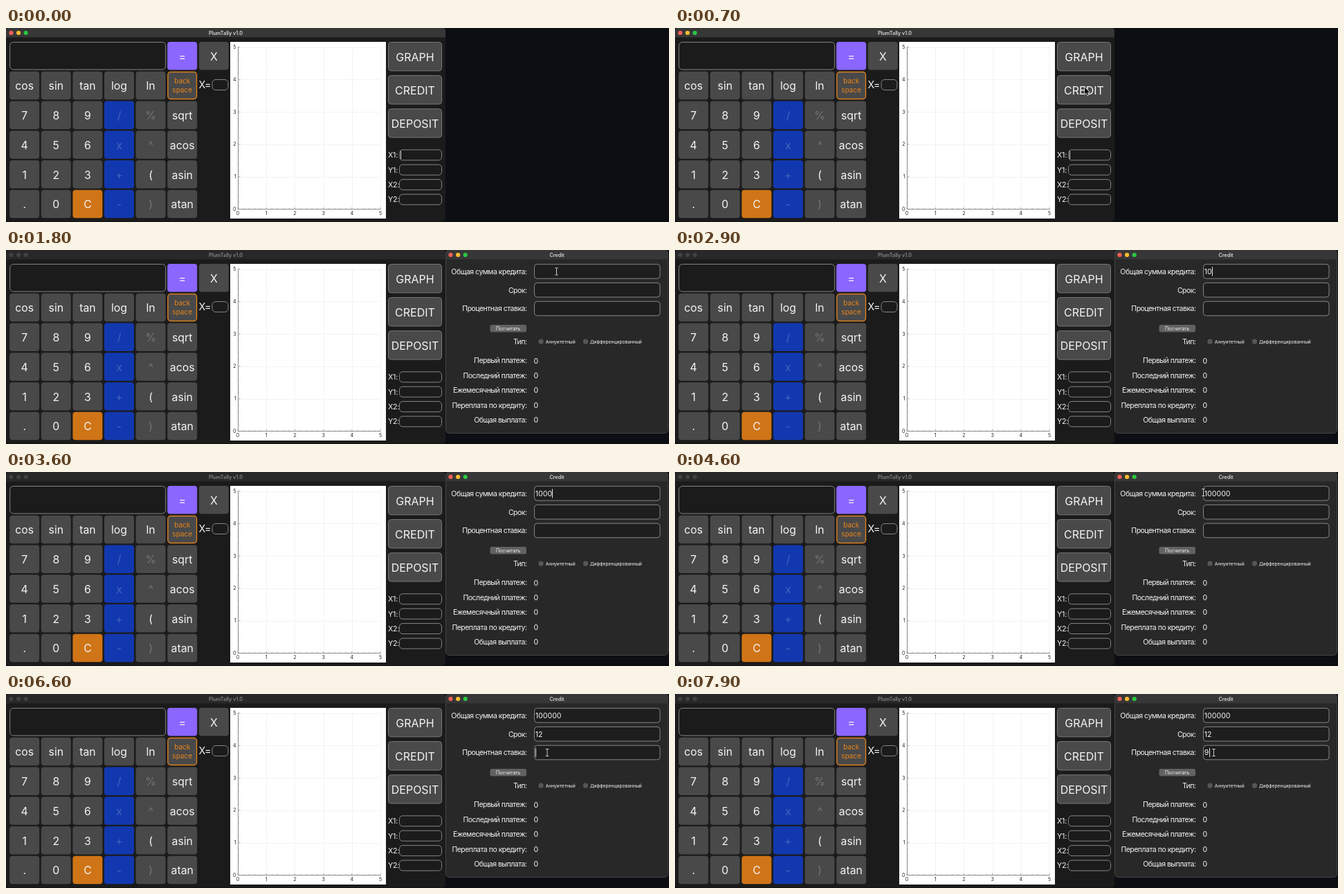
Recreate the animation shown at these times as an HTML page with a canvas. Size 958 by 280 pixels, loop 8000 ms.

```html
<!DOCTYPE html>
<html lang="ru">
<head>
<meta charset="utf-8">
<title>Calculator</title>
<style>
html, body { margin: 0; width: 100%; height: 100%; overflow: hidden; background: #0d0e13; }
canvas { display: block; }
</style>
</head>
<body>
<canvas id="stage" width="958" height="280"></canvas>
<script>
const ctx = document.getElementById('stage').getContext('2d');
const LOOP = 8000;
const OPEN = 800;
const GREY = '#494949', DARK = '#1b1b1b', EDGE = '#858585', WHITE = '#f4f4f4';
const BLUE = '#1238b0', ORANGE = '#cf7417';

function box(x, y, w, h, r, fill, edge, line = 1) {
  ctx.beginPath();
  ctx.roundRect(x, y, w, h, r);
  if (fill) { ctx.fillStyle = fill; ctx.fill(); }
  if (edge) { ctx.strokeStyle = edge; ctx.lineWidth = line; ctx.stroke(); }
}

function text(str, x, y, size, color = WHITE, align = 'center', weight = 400, track = 0) {
  ctx.font = `${weight} ${size}px Inter, "Open Sans", sans-serif`;
  ctx.letterSpacing = track + 'px';
  ctx.textAlign = align;
  ctx.fillStyle = color;
  ctx.fillText(str, x, y + size * 0.36);
}

function dot(x, y, r, color) {
  ctx.beginPath();
  ctx.arc(x, y, r, 0, Math.PI * 2);
  ctx.fillStyle = color;
  ctx.fill();
}

function line(x1, y1, x2, y2, color, width = 1) {
  ctx.beginPath();
  ctx.moveTo(x1, y1);
  ctx.lineTo(x2, y2);
  ctx.strokeStyle = color;
  ctx.lineWidth = width;
  ctx.stroke();
}

function titleBar(x, w, title, active) {
  box(x, 0, w, 13.5, [4, 4, 0, 0], active ? '#373737' : '#282828');
  const lights = active ? ['#fe5f57', '#febc2e', '#28c840'] : Array(3).fill('#414141');
  lights.forEach((c, i) => dot(x + 7.5 + i * 10.6, 7, 3.1, c));
  text(title, x + w / 2, 7, 7.2, active ? '#d8d8d8' : '#858585', 'center', 600);
}

// Keypad rows, left to right
const KEYS = [
  ['', '', '', '', '', '=', 'X'],
  ['cos', 'sin', 'tan', 'log', 'ln', 'back'],
  ['7', '8', '9', '/', '%', 'sqrt'],
  ['4', '5', '6', 'x', '^', 'acos'],
  ['1', '2', '3', '+', '(', 'asin'],
  ['.', '0', 'C', '-', ')', 'atan']
];

function key(label, col, row) {
  const x = 5.2 + col * 45.6, y = 20 + row * 42.75, w = 43, h = 40.5;
  if (label === 'back') {
    box(x + 0.7, y + 0.7, w - 1.4, h - 1.4, 4, GREY, '#dc8020', 1.4);
    text('back', x + w / 2, 76.5, 10, '#e8851a');
    text('space', x + w / 2, 89.5, 10, '#e8851a');
    return;
  }
  let fill = GREY, color = WHITE;
  if (col === 3 && row > 1) { fill = BLUE; color = '#4463bd'; }
  if (label === 'C') fill = ORANGE;
  if (label === '=') fill = '#8b66ff';
  if ('%^)'.includes(label)) color = '#757575';
  box(x, y, w, h, 4, fill);
  text(label, x + w / 2, y + h / 2 + 0.8, 15.8, color);
}

function plot() {
  ctx.fillStyle = '#fff';
  ctx.fillRect(324, 20, 225, 255);
  const px = v => 335 + v * 41.2, py = v => 261.5 - v * 46.8;
  ctx.setLineDash([1, 1]);
  for (let i = 1; i <= 5; i++) {
    line(Math.round(px(i)) + 0.5, 27, Math.round(px(i)) + 0.5, 261, '#e7e7e7');
    line(335, Math.round(py(i)) + 0.5, 541, Math.round(py(i)) + 0.5, '#e7e7e7');
  }
  ctx.setLineDash([]);
  line(335.5, 27, 335.5, 261.5, '#8a8a8a');
  line(335, 261.5, 541.5, 261.5, '#8a8a8a');
  for (let i = 0; i <= 25; i++) {
    const len = i % 5 ? 1.3 : 2.8;
    line(px(i / 5), 261.5, px(i / 5), 261.5 - len, '#777', 0.6);
    line(335.5, py(i / 5), 335.5 + len, py(i / 5), '#777', 0.6);
  }
  for (let i = 0; i <= 5; i++) {
    text(i, px(i), 267.8, 7, '#222');
    text(i, 332.5, py(i), 7, '#222', 'right');
  }
}

function calculator(t) {
  const active = t < OPEN;
  box(0, 0, 635, 279.5, 5, DARK);
  titleBar(0, 635, 'PlumTally v1.0', active);
  box(5.7, 20.5, 225, 39.5, 5, DARK, EDGE);
  KEYS.forEach((row, r) => row.forEach((label, c) => label && key(label, c, r)));
  text('X=', 278.5, 82, 14.3, WHITE, 'left', 400, -0.5);
  box(298, 74.5, 23, 15, 5, DARK, EDGE);
  plot();
  ['GRAPH', 'CREDIT', 'DEPOSIT'].forEach((s, i) => {
    const y = 20.5 + i * 48.1;
    box(552.5, y, 77, 41.3, 4, GREY, '#777');
    text(s, 591, y + 21.3, 16);
  });
  ['X1:', 'Y1:', 'X2:', 'Y2:'].forEach((s, i) => {
    const y = 183.3 + i * 21.4;
    text(s, 552, y, 10.7, WHITE, 'left', 400, -0.2);
    box(568.5, y - 7.5, 61, 15, 4.5, DARK, EDGE);
  });
  if (active && (t < 100 || t >= 500)) line(570.5, 177.5, 570.5, 189, '#ddd');
}

// [time, field, value]
const TYPED = [
  [2600, 0, '1'], [2900, 0, '10'], [3100, 0, '100'], [3600, 0, '1000'],
  [3800, 0, '10000'], [4000, 0, '100000'], [5500, 1, '1'], [5600, 1, '12'], [7400, 2, '9']
];
// [time, field holding the caret, or -1 while it is dark]
const CARET = [
  [800, 0], [1800, -1], [2300, 0], [4600, -1], [5000, 1], [6500, 2], [7000, -1], [7400, 2]
];
const FIELDS = ['Общая сумма кредита:', 'Срок:', 'Процентная ставка:'];
const RESULTS = [
  'Первый платеж:', 'Последний платеж:', 'Ежемесячный платеж:',
  'Переплата по кредиту:', 'Общая выплата:'
];

const last = (list, t) => list.filter(e => e[0] <= t).pop();
const label = (s, y) => text(s, 752.5, y, 10.5, WHITE, 'right', 400, -0.5);

function creditWindow(t) {
  box(635.5, 0.5, 321, 264, 5, '#282828', '#454545');
  titleBar(635, 322, 'Credit', true);
  const values = ['', '', ''];
  TYPED.forEach(([at, i, s]) => { if (at <= t) values[i] = s; });
  const caret = last(CARET, t)[1];
  FIELDS.forEach((s, i) => {
    const y = 31 + i * 26.8;
    label(s, y);
    box(763.5, y - 10.4, 181.5, 20.6, 4, '#1e1e1e', EDGE);
    text(values[i], 764.8, y, 10.6, WHITE, 'left');
    if (caret === i) {
      const x = Math.round(765 + ctx.measureText(values[i]).width) + 0.5;
      line(x, y - 6.5, x, y + 6.5, '#e8e8e8');
    }
  });
  box(699.5, 108, 52.5, 10.5, 2.5, '#626262');
  text('Посчитать', 725.7, 113.2, 6.9);
  label('Тип:', 132.5);
  dot(773, 132.2, 3.6, '#565656');
  text('Аннуитетный', 779.7, 132.3, 6.7, WHITE, 'left');
  dot(837.5, 132.2, 3.6, '#565656');
  text('Дифференцированный', 844, 132.3, 6.7, WHITE, 'left');
  RESULTS.forEach((s, i) => {
    const y = 159.7 + i * 21.4;
    label(s, y);
    text('0', 762.5, y, 10.6, WHITE, 'left');
  });
}

function arrow(x, y) {
  const pts = [[0, 0], [0, 10], [2.3, 8], [3.8, 11.5], [5.4, 10.8], [3.9, 7.4], [7, 7.2]];
  ctx.beginPath();
  pts.forEach(([dx, dy]) => ctx.lineTo(x + dx, y + dy));
  ctx.closePath();
  ctx.lineJoin = 'round';
  ctx.strokeStyle = '#e8e8e8';
  ctx.lineWidth = 1.6;
  ctx.stroke();
  ctx.fillStyle = '#080808';
  ctx.fill();
}

function beam(x, y) {
  for (const [color, w] of [['#111', 2], ['#d5d5d5', 1]]) {
    line(x, y - 4.5, x, y + 4.5, color, w);
    line(x - 2.3, y - 5, x + 2.3, y - 5, color, w);
    line(x - 2.3, y + 5, x + 2.3, y + 5, color, w);
  }
}

// [time, shape, x, y]; the pointer is refreshed ten times a second
const POINTER = [
  [0], [100, arrow, 274, 40], [200, arrow, 420, 22], [300, arrow, 560, 50],
  [400, arrow, 618, 80], [500, arrow, 592, 85.5],
  [1100, arrow, 610, 78], [1200, arrow, 690, 50], [1300, arrow, 762, 28],
  [1400, beam, 795.5, 31], [2600],
  [4600, beam, 763.5, 29.5], [4700, beam, 764, 38], [4800, beam, 768, 50],
  [4900, beam, 775, 61], [5000, beam, 779, 58.5], [5500],
  [6100, beam, 779, 59], [6200, beam, 780, 67], [6300, beam, 781, 78],
  [6400, beam, 782, 84.5], [7400], [7900, beam, 778.5, 84.5]
];

function draw(t) {
  ctx.fillStyle = '#0d0e13';
  ctx.fillRect(0, 0, 958, 280);
  calculator(t);
  if (t >= OPEN) creditWindow(t);
  const [, shape, x, y] = last(POINTER, t);
  if (shape) shape(x, y);
}

function tick() {
  draw(performance.now() % LOOP);
  requestAnimationFrame(tick);
}
tick();
</script>
</body>
</html>
```
